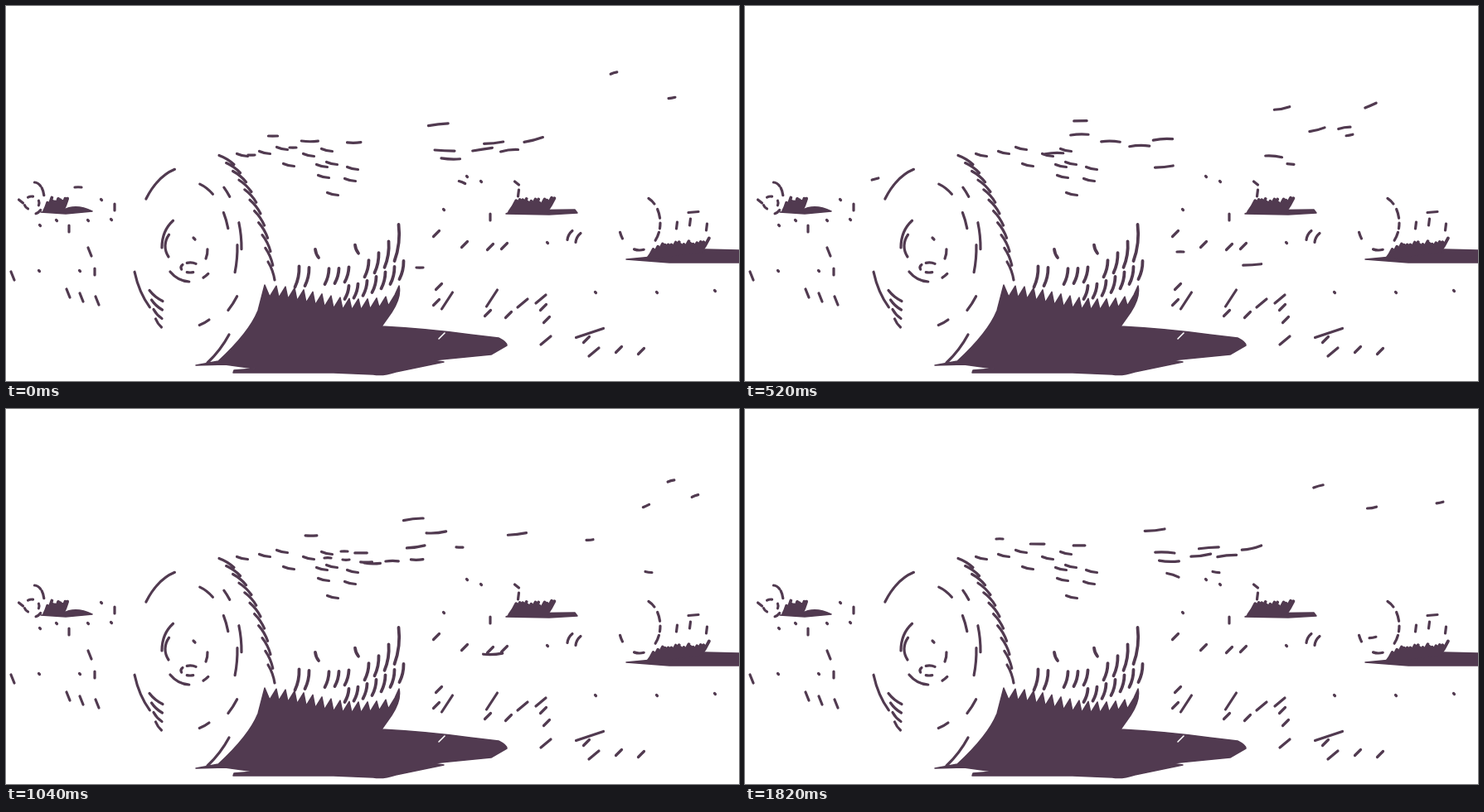
An HTML page with a canvas for the animation above (1.95 s loop, 884 by 453 pixels).

```html
<!DOCTYPE html>
<html lang="en">
<head>
<meta charset="utf-8">
<title>Hay bales in the wind</title>
<style>
html, body { margin: 0; width: 100%; height: 100%; overflow: hidden; background: #fff; }
canvas { display: block; }
</style>
</head>
<body>
<canvas id="stage" width="884" height="453"></canvas>
<script>
const ctx = document.getElementById('stage').getContext('2d');
const INK = '#513a50', STEP = 130, STEPS = 15;
const marks = new Path2D(), masses = new Path2D(), blades = new Path2D();

let seed = 7;
const random = () => (seed = seed * 16807 % 2147483647) / 2147483647;

// A brush stroke centred on x, y, running along dx, dy and bowed sideways.
function stroke(path, x, y, dx, dy, bow = 0) {
  path.moveTo(x - dx / 2, y - dy / 2);
  path.quadraticCurveTo(x - dy * bow, y + dx * bow, x + dx / 2, y + dy / 2);
}

// Dashes along an ellipse, given as pairs of angles in degrees.
function ring(cx, cy, rx, ry, ...spans) {
  for (const [from, to] of spans) {
    const a = from * Math.PI / 180, b = to * Math.PI / 180;
    marks.moveTo(cx + rx * Math.cos(a), cy + ry * Math.sin(a));
    marks.ellipse(cx, cy, rx, ry, 0, a, b);
  }
}

// Equal strokes at the given points.
function scatter(dx, dy, bow, ...points) {
  for (const [x, y] of points) stroke(marks, x, y, dx, dy, bow);
}

// A row of leaning grass with ragged tips.
function tuft(x1, y1, x2, y2, count, height, lean) {
  for (let i = 0; i < count; i++) {
    const k = i / (count - 1), h = height * (.6 + .4 * random());
    const x = x1 + (x2 - x1) * k, y = y1 + (y2 - y1) * k;
    stroke(blades, x + lean * h / 2, y - h / 2, lean * h, -h, .05);
  }
}

function largeBale() {
  ring(220, 292, 64, 98, [217, 236], [233, 255], [-48, -39], [-18, 1]);
  ring(220, 292, 50, 80, [-74, -54], [-32, -17]);
  ring(220, 292, 59, 96, [-2, 18], [65, 77]);
  ring(222, 292, 70, 100, [36, 49], [134, 163]);
  ring(222, 292, 34, 41, [180, 233], [50, 62], [92, 135]);
  ring(222, 290, 30, 26, [150, 212]);
  ring(222, 295, 21, 24, [-3, 25]);
  ring(222, 316, 11, 6, [70, 110], [160, 215], [250, 310]);
  stroke(marks, 227, 281, 2, 2);
  for (let i = 0; i < 4; i++) stroke(marks, 181 + i, 350 + i * 11, 16 - i * 3, 13 - i, .12);

  // Straw ends tumbling over the shoulder
  for (let i = 0; i < 11; i++) {
    const k = i / 10, j = 1 - k;
    const x = j * j * 266 + 2 * j * k * 308 + k * k * 320;
    const y = j * j * 186 + 2 * j * k * 232 + k * k * 320;
    stroke(marks, x, y, 18 - 10 * k, 11 + 11 * k, -.1);
  }
  scatter(13, 3, .1, [285, 180], [312, 177], [333, 172], [341, 192], [365, 180], [387, 174],
    [381, 193], [393, 190], [383, 206], [415, 210], [418, 196], [394, 227]);

  // Shaded side: an upper row rising to the right, a lower one filling in
  for (let i = 0; i <= 10; i++) {
    const k = i / 10, loose = i === 2 || i === 6;
    const length = loose ? 10 : 17 + 8 * (1 - k) ** 4 + 27 * k ** 6;
    const y = 327 - 41 * k ** 4 - (loose ? 28 : 0);
    stroke(blades, 351 + 12 * i, y, loose ? 4 : -5, length, loose ? .15 : -.12);
  }
  for (let i = 0; i <= 6; i++)
    stroke(blades, 411 + 11 * i, 346 - 27 * (i / 6) ** 1.5, -5, 16 + i, -.12);

  // Ragged upper edge of the shadow
  let edge = '';
  for (let x = 318; x < 470; x += 11) {
    const tip = 346 + 8 * Math.sin((x - 365) / 35);
    edge += `L${x} ${tip + 13} ${x + 8} ${tip}`;
  }
  masses.addPath(new Path2D(`M312 337${edge}L474 338Q477 352 465 370L453 387Q510 390 560 397L594 401
    Q604 406 604 410L585 421 514 428 528 430 470 442Q455 447 443 445L395 443 274 443 275 440 300 438
    264 433 229 434 256 429Q293 395 304 368Z`));
  stroke(marks, 256, 414, -26, 34, -.08);
}

function farBales() {
  masses.addPath(new Path2D('M42 249L68 247Q84 238 104 248L72 251Z'));
  masses.addPath(new Path2D('M603 251L612 247 686 246 689 250 655 252Z'));
  masses.addPath(new Path2D('M748 306L790 302 843 294 884 295 884 310 800 310Z'));
  tuft(46, 248, 68, 248, 9, 17, .4);
  tuft(607, 249, 652, 248, 13, 17, .6);
  tuft(774, 305, 838, 297, 17, 17, .6);
  ring(34, 232, 12, 19, [-88, -50], [-40, -10], [50, 80]);
  ring(31, 238, 9, 8, [-120, -80], [-20, 20], [120, 160]);
  ring(764, 262, 25, 33, [-64, -44], [-30, -10], [0, 12], [20, 40], [78, 105], [145, 160]);
  scatter(5, 4, 0, [18, 236], [616, 214]);
  scatter(-1, 8, 0, [618, 226], [809, 265], [825, 261], [845, 267]);
  scatter(12, -1, 0, [829, 249]);
}

function stubble() {
  scatter(4, 10, 0, [8, 326], [101, 297], [75, 347], [91, 352], [110, 356]);
  scatter(0, 8, 0, [107, 321], [76, 269], [131, 243], [584, 255]);
  scatter(-7, 7, 0, [519, 275], [553, 288], [584, 291], [601, 290], [522, 339], [519, 358],
    [581, 371], [606, 373], [648, 364], [652, 379], [700, 403], [739, 415], [766, 417]);
  scatter(-12, 10, 0, [623, 359], [645, 354], [651, 404], [709, 418]);
  scatter(-13, 20, 0, [532, 356], [586, 353]);
  scatter(-33, 11, 0, [704, 395]);
  scatter(-6, 11, .2, [680, 277], [690, 280]);
  scatter(1, 1, 0, [115, 234], [40, 320], [41, 265], [61, 259], [127, 258], [99, 259], [89, 320],
    [528, 246], [556, 206], [573, 212], [653, 286], [711, 346], [785, 346], [855, 344]);
}

largeBale();
farBales();
stubble();

// Flying straw: step of take-off, start x y, steps in the air, end x y.
const straws = [
  [0, 296, 180, 12, 660, 134], [0, 346, 171, 8, 704, 158], [2, 434, 197, 6, 772, 117],
  [2, 375, 139, 13, 733, 81], [6, 340, 153, 17, 802, 87], [6, 409, 185, 17, 831, 105],
  [6, 420, 186, 8, 568, 197], [6, 400, 174, 15, 802, 133], [6, 442, 184, 13, 729, 156],
  [6, 471, 182, 15, 824, 87], [8, 408, 172, 15, 775, 197], [8, 410, 182, 11, 658, 191],
  [8, 388, 180, 7, 550, 213], [12, 331, 163, 11, 547, 167], [12, 375, 165, 17, 838, 113],
  [14, 307, 157, 16, 803, 111],
  [0, 499, 316, 6, 706, 304], [4, 525, 297, 10, 757, 276], [0, 87, 219, 4, 157, 209]
];

// The wind speeds each straw up, and lifts it mostly near the end.
function fly(path, [, x1, y1, life, x2, y2], age) {
  const k = age / life, dx = x2 - x1, dy = y2 - y1;
  const angle = Math.atan2(dy * 3 * k * k, dx * (.45 + 1.1 * k));
  const length = 8 + 16 * Math.sin(Math.PI * k);
  stroke(path, x1 + dx * k * (.45 + .55 * k), y1 + dy * k ** 3,
    length * Math.cos(angle), length * Math.sin(angle), .08 * Math.sin(x1 + age));
}

function ink(path, width, color = INK) {
  ctx.strokeStyle = color;
  ctx.lineWidth = width;
  ctx.stroke(path);
}

function draw(step) {
  ctx.fillStyle = '#fff';
  ctx.fillRect(0, 0, 884, 453);
  ctx.fillStyle = INK;
  ctx.lineCap = ctx.lineJoin = 'round';
  ctx.fill(masses);
  ink(masses, 1.5);
  ink(marks, 3.2);
  ink(blades, 3.8);

  const air = new Path2D();
  for (const straw of straws)
    for (let age = step - straw[0]; age <= straw[3]; age += STEPS)
      if (age >= 0) fly(air, straw, age);
  ink(air, 3.2);

  ink(new Path2D('M522 402L529 395'), 1.6, '#fff');
}

function frame() {
  draw(Math.floor(performance.now() / STEP) % STEPS);
  requestAnimationFrame(frame);
}
frame();
</script>
</body>
</html>
```
